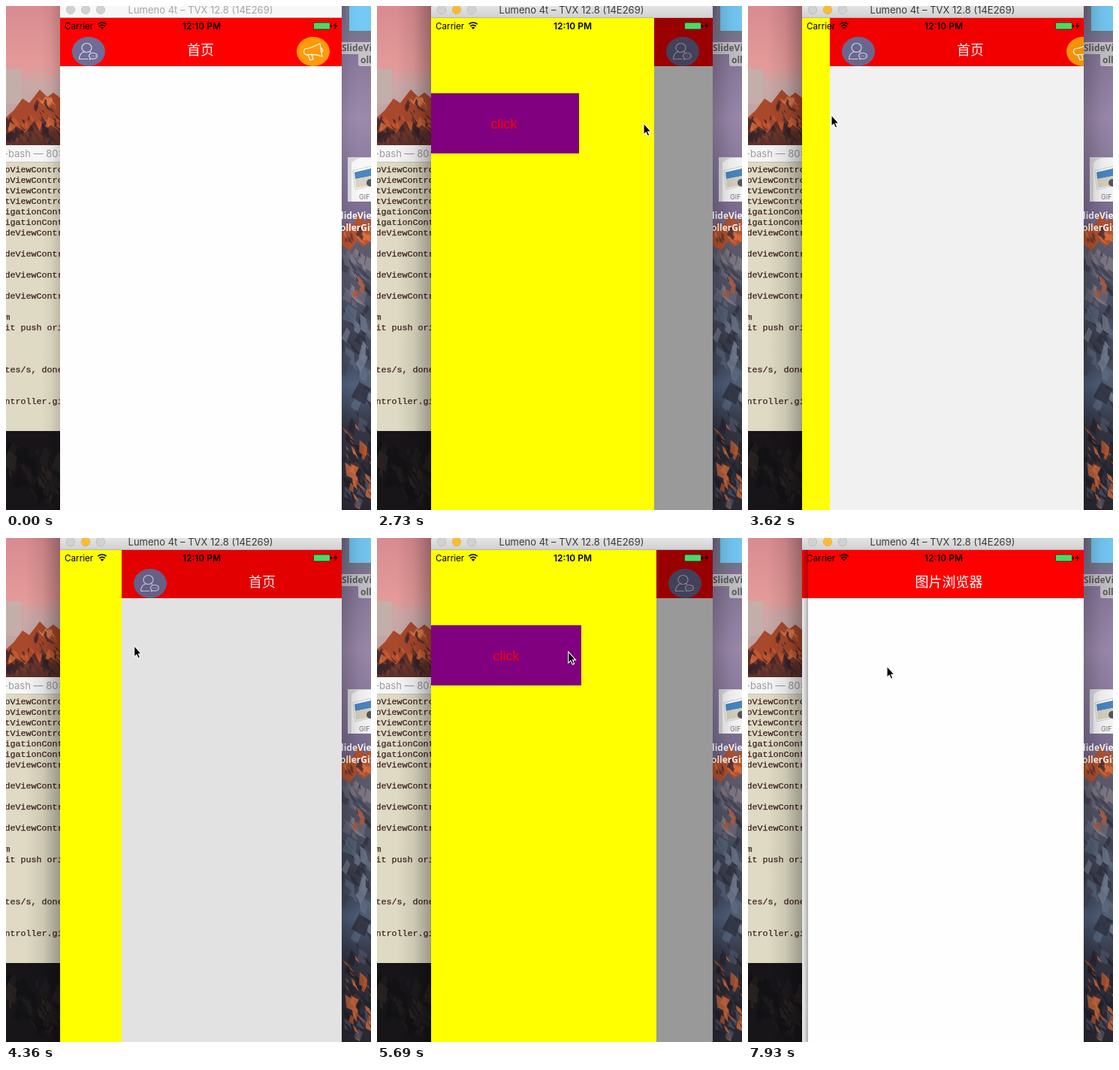
Animation, 486 px wide and 670 px high, one loop 8 s. Source, as an HTML page:

```html
<!DOCTYPE html>
<html lang="en">
<head>
<meta charset="utf-8">
<title>Side drawer demo</title>
<style>
html, body { margin: 0; width: 100%; height: 100%; overflow: hidden; }
svg { display: block; }
text { font-family: Inter, "Liberation Sans", sans-serif; white-space: pre; }
.mono text { font: 11.7px "Liberation Mono", monospace; fill: #3f2020; stroke: #3f2020; stroke-width: .25; }
.label { font: bold 12px "Open Sans", sans-serif; }
.nav { font: 500 18px "Noto Sans CJK SC", "Noto Sans CJK", sans-serif; fill: #fff; text-anchor: middle; }
.line { fill: none; stroke-width: 1.2; stroke-linecap: round; stroke-linejoin: round; }
</style>
</head>
<body>
<svg width="486" height="670" viewBox="0 0 486 670">
  <defs>
    <linearGradient id="dusk" x2="0" y2="1">
      <stop stop-color="#d88b90"/><stop offset=".42" stop-color="#e39a98"/>
      <stop offset=".56" stop-color="#c9a9a8"/><stop offset="1" stop-color="#b79b9f"/>
    </linearGradient>
    <linearGradient id="sky" x2="0" y2="1">
      <stop stop-color="#77698c"/><stop offset=".45" stop-color="#9c8aac"/><stop offset="1" stop-color="#6f6288"/>
    </linearGradient>
    <linearGradient id="slope" x2="0" y2="1">
      <stop stop-color="#6a6274"/><stop offset=".3" stop-color="#4d5266"/><stop offset=".45" stop-color="#3b3d4c"/>
      <stop offset=".58" stop-color="#50607c"/><stop offset=".72" stop-color="#343645"/><stop offset="1" stop-color="#2b2833"/>
    </linearGradient>
    <linearGradient id="bar" x2="0" y2="1">
      <stop stop-color="#e4e4e4"/><stop offset="1" stop-color="#d0d0d0"/>
    </linearGradient>
    <linearGradient id="fade">
      <stop stop-opacity="0"/><stop offset=".5" stop-opacity=".08"/><stop offset="1" stop-opacity=".3"/>
    </linearGradient>
    <linearGradient id="edge">
      <stop stop-opacity="0"/><stop offset="1" stop-opacity=".25"/>
    </linearGradient>
  </defs>

  <!-- desktop, left -->
  <rect width="72" height="190" fill="url(#dusk)"/>
  <path d="M0 84H20V130H0Z" fill="#c4aeaa"/>
  <path d="M0 148L10 139 22 123 31 129 45 111 55 121 63 115 72 122V186H0Z" fill="#a9492c"/>
  <g id="leftPeak"></g>
  <path d="M0 172L14 160 26 168 38 152 46 170 60 158 72 168V186H0Z" fill="#2f2028" opacity=".6"/>
  <rect y="560" width="72" height="110" fill="#171518"/>
  <g id="leftRocks"></g>
  <rect y="185" width="72" height="23" fill="#f6f6f6"/>
  <path d="M0 207.5H72" stroke="#c4c4c0"/>
  <text x="-3" y="201" font-size="13" fill="#9c9c9c">-bash — 80×24</text>
  <rect y="208" width="72" height="357" fill="#dedac3"/>
  <g id="term" class="mono"></g>

  <!-- desktop, right -->
  <rect x="447" width="39" height="330" fill="url(#sky)"/>
  <path d="M447 298L454 286 461 292 470 274 478 287 486 280V670H447Z" fill="url(#slope)"/>
  <path d="M447 300L455 287 461 293 470 275 478 288 486 282V312L476 320 468 312 458 325 447 318Z" fill="#b4532f"/>
  <g id="rightPeak"></g>
  <path d="M452 0H486V41H452Z" fill="#77788a"/>
  <path d="M457 0H486V33H457Z" fill="#74c9f5"/>
  <path d="M447 48H486V64H447ZM469 64H486V80H472Q469 80 469 77Z" fill="#c5c3c8"/>
  <text class="label" x="447" y="60" fill="#5b5b60">SlideView</text>
  <text class="label" x="472" y="76" fill="#5b5b60">oller</text>
  <path d="M455 201H486V260H455Z" fill="#dcdcdf"/>
  <path d="M460 260V208Q467 202 475 202H486V260Z" fill="#f8f8f8"/>
  <path d="M462 219L486 213V239L465 244Z" fill="#fff" stroke="#bbb" stroke-width=".7"/>
  <path d="M464 221L486 216V226L465 230Z" fill="#4a87c4"/>
  <path d="M465 230L486 226V238L466 242Z" fill="#d9d3c0"/>
  <circle cx="485" cy="235" r="5" fill="#55575c"/>
  <text x="470" y="257" font-size="9" fill="#777">GIF</text>
  <text class="label" x="446" y="283" fill="#fff">lideView</text>
  <text class="label" x="445" y="299" fill="#fff">ollerGif</text>

  <!-- window shadow -->
  <rect id="shadeL" height="670" fill="url(#fade)"/>
  <rect id="shadeR" height="670" fill="url(#fade)" transform="translate(894) scale(-1 1)"/>

  <!-- simulator window -->
  <g id="title">
    <rect id="titleBg" x="72" width="375" height="16"/>
    <g stroke="#0002" stroke-width=".8">
      <circle cx="86" cy="5" r="5.8" fill="#d1d1d1"/>
      <circle id="minimise" cx="106" cy="5" r="5.8"/>
      <circle cx="126" cy="5" r="5.8" fill="#d1d1d1"/>
    </g>
    <text id="titleText" x="259" y="10" font-size="13" text-anchor="middle">Lumeno 4t – TVX 12.8 (14E269)</text>
    <path d="M72 15.5H447" stroke="#b5b5b5"/>
  </g>

  <svg x="72" y="16" width="375" height="654" viewBox="0 16 375 654">
    <rect y="16" width="375" height="654" fill="#fefefe"/>
    <g id="root">
      <g id="drawer">
        <rect y="16" width="301" height="654" fill="#ff0"/>
        <rect y="116" width="200" height="80" fill="purple"/>
        <text x="100" y="163" text-anchor="middle" fill="red" style="font:18px 'Liberation Sans',sans-serif">click</text>
      </g>
      <g id="home">
        <rect y="16" width="375" height="654" fill="#fefefe"/>
        <rect y="16" width="375" height="64" fill="red"/>
        <text class="nav" x="187" y="65">首页</text>
        <ellipse cx="38" cy="60.5" rx="22" ry="19.5" fill="#706c96"/>
        <g class="line" stroke="#d6d6ee">
          <ellipse cx="35.5" cy="55.5" rx="6.5" ry="6"/>
          <path d="M25.5 70.5Q26 62.5 32 61M25.5 70.5H37M39 60.5L41 61.5"/>
          <path d="M39.5 71L40 69Q37 66 40 63.5 44 61.5 48 63.5 51 66.500 48 69 45 71 42 70Z"/>
          <path d="M42 66.5H42.2M44.5 66.5H44.7M47 66.5H47.2"/>
        </g>
        <ellipse cx="337" cy="60.5" rx="22" ry="19.5" fill="#ff9a0a"/>
        <path class="line" stroke="#fff" d="M326 57Q332 57 346 50L349 67Q339 63 328 65 322 62 326 57ZM330 65L333 72 337 71 335 64M348 56Q351 58 349 61"/>
        <rect id="dim" y="16" width="375" height="654"/>
      </g>
    </g>
    <rect id="veil" y="16" width="375" height="654"/>
    <g id="page">
      <rect x="-6" y="16" width="6" height="654" fill="url(#edge)"/>
      <rect y="16" width="375" height="654" fill="#fefefe"/>
      <rect y="16" width="375" height="64" fill="red"/>
      <text class="nav" x="187.5" y="65">图片浏览器</text>
    </g>
    <g>
      <text x="6" y="31" font-size="11.7">Carrier</text>
      <path fill="none" stroke="#000" stroke-width="1.7" d="M50.3 24.2Q56 19.8 61.7 24.2M52.3 26.8Q56 24 59.7 26.8"/>
      <path d="M53.6 28.5Q56 26.8 58.4 28.5L56 31Z"/>
      <text x="188.5" y="31" font-size="12" font-weight="600" text-anchor="middle">12:10 PM</text>
      <rect x="337.5" y="22" width="22" height="9" rx="1.5" fill="#4cd964" stroke="#222" stroke-width=".8"/>
      <path d="M360.5 25V28.5Q362.5 28 362.5 26.7 362.5 25.5 360.5 25ZM367.5 22L364 27H366.5L365.5 31 369.5 25.5H367Z"/>
    </g>
  </svg>

  <path id="mouse" d="M.5 1V16L3.700 13 6 18 8.300 17 6.200 12H10.300Z" stroke="#fff" stroke-width="1.1"/>
</svg>
<script>
const $ = id => document.getElementById(id);
const set = (id, attrs) => { for (const a in attrs) $(id).setAttribute(a, attrs[a]); };
const slide = (id, x, y = 0) => set(id, { transform: `translate(${x} ${y})` });

// terminal lines: row number and visible text
const rows = [[0, 'oViewContro'], [1, 'oViewContro'], [2, 'tViewContro'], [3, 'tViewContro'],
  [4, 'igationCont'], [5, 'igationCont'], [6, 'deViewContr'], [8, 'deViewContr'], [10, 'deViewContr'],
  [12, 'deViewContr'], [14, 'm'], [15, 'it push ori'], [19, 'tes/s, done'], [22, 'ntroller.gi']];
$('term').innerHTML = rows.map(([r, s]) => `<text x="-1.5" y="${221 + r * 14}">${s}</text>`).join('');

// slanting rock facets scattered over a box
let seed = 7;
const rand = () => (seed = seed * 16807 % 2147483647) / 2147483647;
function facets(id, x, y, w, h, n, size, colours) {
  let out = '';
  for (let i = 0; i < n; i++) {
    const s = size * (.5 + rand()), thick = s * (.2 + .25 * rand());
    const px = x + rand() * w, py = y + rand() * Math.max(0, h - s);
    const lean = s * (rand() - .3);
    const p = `M${px} ${py}L${px + thick} ${py + s * .3}L${px + lean + thick} ${py + s}L${px + lean - thick * .4} ${py + s * .7}Z`;
    out += `<path d="${p}" fill="${colours[i % colours.length]}" opacity=".8"/>`;
  }
  $(id).innerHTML += out;
}
facets('leftPeak', 0, 142, 72, 44, 60, 15, ['#3a242b', '#d96a3a', '#4b2a2e', '#c95a30']);
facets('leftPeak', 38, 118, 24, 30, 14, 9, ['#ea8350', '#48282c']);
facets('leftRocks', 0, 575, 72, 95, 34, 22, ['#211d1e', '#121114', '#2c2422']);
facets('rightPeak', 447, 290, 37, 30, 18, 10, ['#e37542', '#5a3434']);
facets('rightPeak', 447, 322, 39, 80, 34, 18, ['#6c6a7c', '#3f4254', '#8a7f88']);
facets('rightPeak', 465, 355, 18, 35, 8, 11, ['#b55a38', '#37303a']);
facets('rightPeak', 447, 395, 39, 155, 44, 24, ['#2f313e', '#5a6980', '#454a5c', '#727b90']);
facets('rightPeak', 447, 545, 39, 125, 64, 17, ['#272632', '#4c5164', '#b55731', '#20202a', '#d46d3e']);

// tracks: [step, value], linear between points
const STEP = 148.4, START = 490, LOOP = 8000;
const tracks = {
  open: [[5, 0], [6, 70], [7, 235.5], [8, 300], [14, 300], [15, 297], [16, 270], [21, 37], [22, 4], [23, 0],
    [24, 0], [29, 205], [31, 285], [32, 297], [33, 300], [39, 300], [40, 230], [41, 78], [42, 0]],
  push: [[39, 382], [40, 280], [41, 77], [42, 10], [43, 0], [47, 0], [50, 8]],
  x: [[0, 400], [5, 97], [8, 97], [13, 357], [14, 357], [15, 354.5], [21, 110.5], [23, 77], [24, 77],
    [29, 310], [32, 350], [37, 190.5], [43, 190.5], [46, 176], [47, 176], [50, 184.5]],
  y: [[0, 330], [5, 62], [8, 62], [13, 156], [15, 155], [21, 144], [29, 141], [32, 142],
    [37, 155.5], [43, 155.5], [46, 169], [50, 169.5]]
};
function at(name, k) {
  const pts = tracks[name], i = pts.findIndex(p => p[0] >= k);
  if (i < 0) return pts[pts.length - 1][1];
  if (i === 0) return pts[0][1];
  const [a, b] = [pts[i - 1], pts[i]];
  return a[1] + (b[1] - a[1]) * (k - a[0]) / (b[0] - a[0]);
}

function draw(now) {
  const k = Math.floor((now % LOOP - START) / STEP);
  const open = at('open', k), push = at('push', k);
  const cover = Math.max(0, 1 - push / 375);
  const active = k >= 3, spread = active ? 46 : 24;

  set('titleBg', { fill: active ? 'url(#bar)' : '#f7f7f7' });
  set('titleText', { fill: active ? '#3c3c3c' : '#a5a5a5' });
  set('minimise', { fill: active ? '#fdbc2e' : '#d1d1d1' });
  set('shadeL', { x: 72 - spread, width: spread, opacity: active ? 1 : .5 });
  // mirrored about the window's right edge
  set('shadeR', { x: 447 - spread, width: spread, opacity: active ? .7 : .35 });

  slide('root', -112.5 * cover);
  slide('drawer', open - 300);
  slide('home', open);
  set('dim', { opacity: open / 300 * .4 });
  set('veil', { opacity: cover * .1 });
  slide('page', push);
  slide('mouse', at('x', k), at('y', k));
  set('mouse', { visibility: k < 0 ? 'hidden' : 'visible' });
}

const begin = performance.now();
(function loop() {
  draw(performance.now() - begin);
  requestAnimationFrame(loop);
})();
</script>
</body>
</html>
```
